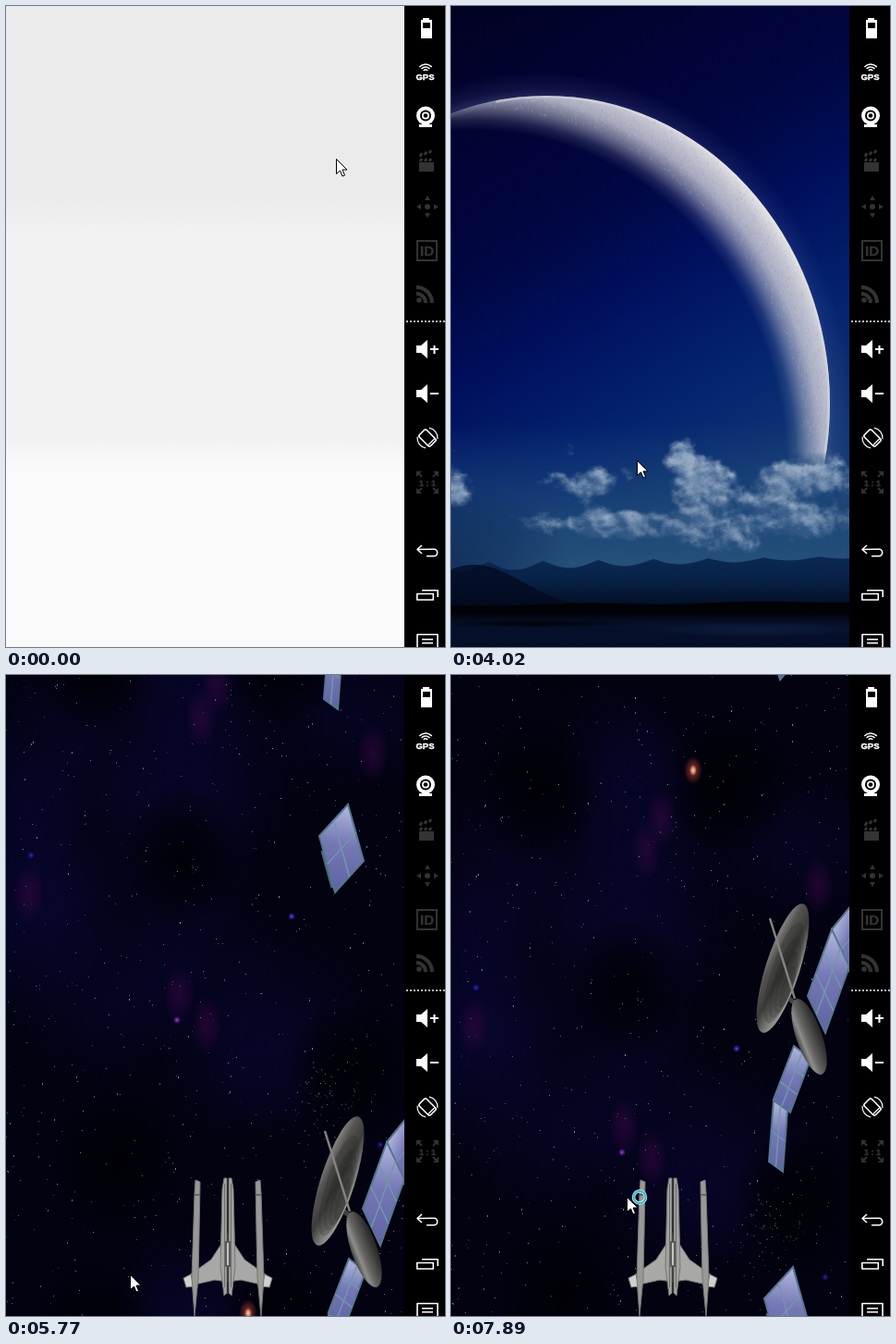
An HTML page with a canvas that plays this animation: 475 px wide and 693 px high, repeating every 8000 ms.

```html
<!DOCTYPE html>
<html>
<head>
<meta charset="utf-8">
<style>
html, body { margin: 0; width: 100%; height: 100%; overflow: hidden; background: #000; }
canvas { display: block; width: 475px; height: 693px; }
</style>
</head>
<body>
<canvas id="stage" width="475" height="693"></canvas>
<script>
const W = 431, H = 693, LOOP = 8000, TILE = 730;
const MENU = 4020, PRESS = 5220, FADE = 5490, GAME = 5610, BUSY = 7890;

// Pointer key points: time, x, y
const POINTER = [[0, 357, 165], [450, 357, 162], [1100, 358, 162], [1110, 194, 435], [1380, 201, 491],
  [4440, 201, 491], [4800, 182, 630], [5060, 134, 648], [7500, 134, 648], [BUSY, 190, 564]];

const clamp = (v, a = 0, b = 1) => Math.min(b, Math.max(a, v));
const mix = (a, b, k) => a + (b - a) * k;
const smooth = (a, b, v) => { const k = clamp((v - a) / (b - a)); return k * k * (3 - 2 * k); };

function layer(w, h, draw) {
  const c = document.createElement('canvas');
  c.width = w; c.height = h;
  draw(c.getContext('2d'));
  return c;
}

function random(seed) {
  return () => {
    seed = (seed + 0x6D2B79F5) | 0;
    let x = Math.imul(seed ^ (seed >>> 15), 1 | seed);
    x = (x + Math.imul(x ^ (x >>> 7), 61 | x)) ^ x;
    return ((x ^ (x >>> 14)) >>> 0) / 4294967296;
  };
}

function noise(x, y) {
  const i = Math.floor(x), j = Math.floor(y);
  const hash = (a, b) => { const s = Math.sin(a * 127.1 + b * 311.7) * 43758.5; return s - Math.floor(s); };
  const u = smooth(0, 1, x - i), v = smooth(0, 1, y - j);
  return mix(mix(hash(i, j), hash(i + 1, j), u), mix(hash(i, j + 1), hash(i + 1, j + 1), u), v);
}

function fractal(x, y) {
  let sum = 0;
  for (let o = 0, a = .5, f = 1 / 32; o < 5; o++, a *= .55, f *= 2) sum += a * noise(x * f, y * f);
  return sum / 1.055;
}

function path(c, pts) {
  c.beginPath();
  for (let i = 0; i < pts.length; i += 2) c.lineTo(pts[i], pts[i + 1]);
}

function line(c, pts, color, width) {
  path(c, pts);
  c.strokeStyle = color; c.lineWidth = width; c.stroke();
}

function poly(c, pts, fill, stroke, width = 1) {
  path(c, pts);
  c.closePath();
  c.fillStyle = fill; c.fill();
  if (stroke) { c.strokeStyle = stroke; c.lineWidth = width; c.stroke(); }
}

function disc(c, x, y, r, fill) {
  c.beginPath(); c.arc(x, y, r, 0, 7);
  c.fillStyle = fill; c.fill();
}

function arc(c, x, y, r, a, b, color, width) {
  c.beginPath(); c.arc(x, y, r, a, b);
  c.strokeStyle = color; c.lineWidth = width; c.stroke();
}

function shade(gradient, stops) {
  for (const [at, color] of stops) gradient.addColorStop(at, color);
  return gradient;
}

function glow(c, x, y, rx, ry, rgb, alpha) {
  c.save();
  c.translate(x, y); c.scale(rx, ry);
  disc(c, 0, 0, 1, shade(c.createRadialGradient(0, 0, 0, 0, 0, 1),
    [[0, `rgba(${rgb},${alpha})`], [.5, `rgba(${rgb},${alpha * .6})`], [1, `rgba(${rgb},0)`]]));
  c.restore();
}

const blank = layer(W, H, c => {
  c.fillStyle = shade(c.createLinearGradient(0, 0, 0, H), [[.3, '#ebebeb'],
    [.355, '#f2f2f2'], [.675, '#f2f2f2'], [.72, '#fafafa']]);
  c.fillRect(0, 0, W, H);
});

const moon = layer(W, H, c => {
  const rnd = random(5), r = 307, lean = -.7, shift = 102;
  const sx = -Math.cos(lean) * shift, sy = -Math.sin(lean) * shift;
  c.save();
  c.translate(103, 430); c.scale(1, 1.085);
  const halo = a => `rgba(120,135,205,${a})`;
  c.fillStyle = shade(c.createRadialGradient(sx * .1, sy * .1, r - 2, sx * .1, sy * .1, r + 32),
    [[0, halo(0)], [.2, halo(.3)], [.45, halo(.13)], [1, halo(0)]]);
  c.fillRect(-W, -H, 2 * W, 2 * H);
  c.beginPath(); c.arc(0, 0, r, 0, 7); c.clip();
  const body = a => `rgba(218,219,234,${a})`;
  c.fillStyle = shade(c.createRadialGradient(sx, sy, 338, sx, sy, r + shift),
    [[0, body(0)], [.15, body(.15)], [.33, body(.5)], [.55, body(.85)], [.8, body(1)], [1, '#fff']]);
  c.fillRect(-W, -H, 2 * W, 2 * H);
  for (let i = 0; i < 2500; i++) {
    const a = -1.9 + rnd() * 2.2, d = r - rnd() * 50, x = Math.cos(a) * d, y = Math.sin(a) * d;
    if (Math.hypot(x - sx, y - sy) < 362) continue;
    c.fillStyle = rnd() < .5 ? 'rgba(255,255,255,.16)' : 'rgba(120,120,155,.12)';
    c.fillRect(x, y, 1, 1 + rnd() * 2);
  }
  arc(c, 0, 0, r - 1, -1.75, .4, 'rgba(255,255,255,.45)', 3);
  c.restore();
  c.globalCompositeOperation = 'destination-out';
  c.fillStyle = shade(c.createLinearGradient(0, 482, 0, 502), [[0, 'rgba(0,0,0,0)'], [1, '#000']]);
  c.fillRect(0, 482, W, H);
});

const clouds = layer(W, H, c => {
  const puffs = [[6, 520, 24, 22], [140, 518, 40, 25], [247, 485, 24, 28], [287, 515, 36, 26],
    [382, 511, 54, 37], [170, 560, 85, 17], [335, 560, 95, 24]];
  const image = c.createImageData(W, H);
  for (let y = 440; y < 600; y++) for (let x = 0; x < W; x++) {
    let density = 0;
    for (const [px, py, rx, ry] of puffs) density += Math.exp(-(((x - px) / rx) ** 2) - ((y - py) / ry) ** 2);
    const n = fractal(x, y * 1.2);
    const slope = n - fractal(x + 4, y * 1.2 - 6);
    const lit = clamp(.5 + slope * 2.6 + (520 - y) / 150);
    const alpha = smooth(.42, .95, Math.min(density, 1) + (n - .5) * 1.5);
    image.data.set([mix(58, 186, lit), mix(100, 205, lit), mix(150, 228, lit), 225 * alpha], (y * W + x) * 4);
  }
  c.putImageData(image, 0, 0);
});

const night = layer(W, H, c => {
  c.fillStyle = shade(c.createLinearGradient(0, 0, 300, 520), [[0, '#020225'], [.2, '#020336'], [.45, '#01084c'],
    [.61, '#001268'], [.82, '#04287c'], [1, '#103a80']]);
  c.fillRect(0, 0, W, H);
  c.fillStyle = shade(c.createLinearGradient(0, 450, 0, 600), [[0, 'rgba(44,94,136,0)'], [1, 'rgba(44,94,136,.85)']]);
  c.fillRect(0, 450, W, H);
  glow(c, 0, 600, 130, 90, '10,35,85', .6);
  c.drawImage(moon, 0, 0);
  c.drawImage(clouds, 0, 0);

  const ridge = (height, fill) => {
    const pts = [];
    for (let x = 0; x <= W + 3; x += 3) pts.push(x, height(x));
    poly(c, [...pts, W, 656, 0, 656], fill);
  };
  ridge(x => 601 - x / 70 + (11 - x / 50) * Math.abs(Math.sin((x - 40) / 19)),
    shade(c.createLinearGradient(0, 595, 0, 650), [[0, '#0b2e5c'], [.5, '#09244d'], [1, '#040f26']]));
  ridge(x => 652 - 48 * Math.exp(-(((x - 25) / 75) ** 2)), 'rgba(3,10,34,.75)');
  ridge(x => 648 - x / 100 + Math.sin(x / 30), '#010206');
  c.fillStyle = shade(c.createLinearGradient(0, 655, 0, H), [[0, '#010206'], [.35, '#071230'], [1, '#06102c']]);
  c.fillRect(0, 655, W, 38);
  glow(c, 330, 674, 120, 8, '24,52,100', .4);
  glow(c, 90, 668, 110, 4, '0,0,4', .9);
});

const space = layer(W, TILE, c => {
  const rnd = random(77);
  const patch = (x, y, rx, ry, rgb, alpha) => {
    for (const wrap of [-TILE, 0, TILE]) glow(c, x, y + wrap, rx, ry, rgb, alpha);
  };
  c.fillStyle = '#020210';
  c.fillRect(0, 0, W, TILE);
  for (let i = 0; i < 14; i++)
    patch(rnd() * W, 120 + i * 34, 70 + rnd() * 60, 80 + rnd() * 60, '9,6,50', .5);
  for (const [x, y] of [[95, 130], [300, 120], [190, 340], [370, 570], [120, 670]]) patch(x, y, 68, 80, '0,0,5', .95);
  for (const [x, y] of [[211, 190], [228, 155], [397, 228], [187, 488], [217, 522], [25, 380]])
    patch(x, y, 17, 32, '50,7,64', .6);
  const star = hue => `hsla(${hue},45%,60%,${.25 + rnd() * .65})`;
  for (let i = 0; i < 620; i++) {
    c.fillStyle = star(180 + rnd() * 60);
    c.fillRect(Math.floor(rnd() * W), Math.floor(rnd() * TILE), 1, rnd() < .2 ? 2 : 1);
  }
  for (let i = 0; i < 70; i++) {
    c.fillStyle = star(185);
    c.fillRect(345 + (rnd() + rnd() - 1) * 45, 600 + (rnd() + rnd() - 1) * 55, 1, 1);
  }
  for (const [x, y, rgb] of [[27, 338, '40,40,200'], [309, 404, '70,70,255'], [405, 651, '50,30,170'], [185, 516, '160,50,230']]) {
    glow(c, x, y, 4, 4, rgb, .8);
    disc(c, x, y, 1, `rgb(${rgb})`);
  }
  glow(c, 262, 103, 10, 15, '150,50,40', .9);
  glow(c, 262, 103, 4, 6, '255,200,170', 1);
});

// A solar panel spanned from one corner by a width and a length vector.
function panel(c, x, y, wx, wy, lx, ly, rows) {
  const fill = shade(c.createLinearGradient(x, y, x + wx + lx, y + wy + ly),
    [[0, '#b3b9df'], [.45, '#7478b4'], [1, '#6063a2']]);
  poly(c, [x, y, x + wx, y + wy, x + wx + lx, y + wy + ly, x + lx, y + ly], fill, '#55778f', 2);
  line(c, [x + wx / 2, y + wy / 2, x + wx / 2 + lx, y + wy / 2 + ly], '#7296ae', 1.5);
  for (let k = 1 / rows; k < .99; k += 1 / rows)
    line(c, [x + lx * k, y + ly * k, x + wx + lx * k, y + wy + ly * k], '#7296ae', 1.5);
}

function tilted(c, x, y, rx, ry, angle, fill) {
  c.beginPath(); c.ellipse(x, y, rx, ry, angle, 0, 7);
  c.fillStyle = fill; c.fill();
}

function drawSatellites(c) {
  panel(c, 412, 275, 19, 45, 22, -27, 1);
  panel(c, 412, 275, 19, 40, -26, 72, 3);
  panel(c, 371, 401, 18, 14, -22, 58, 3);
  panel(c, 349, 460, 15, 11, -5, 66, 2);
  const metal = shade(c.createLinearGradient(335, 300, 383, 325),
    [[0, '#a9a9a5'], [.3, '#555452'], [.55, '#3c3c3a'], [.8, '#7f7f7c'], [1, '#a6a6a2']]);
  tilted(c, 359, 317, 18.5, 73, .31, metal);
  for (let i = 1; i < 5; i++)
    tilted(c, 359 + i * 1.2, 317 + i * 5, 17 - i * 3, 68 - i * 11, .31, 'rgba(28,28,27,.22)');
  line(c, [372, 350, 345, 263], '#83837f', 2.5);
  line(c, [366, 350, 384, 365], '#444', 5);
  tilted(c, 387.5, 391, 14, 43, -.33, shade(c.createLinearGradient(372, 396, 402, 384),
    [[0, '#282827'], [.25, '#8d8d89'], [.45, '#626260'], [.8, '#343433'], [1, '#1f1f1f']]));
  line(c, [342, 690, 353, 730], '#496879', 3);
  panel(c, 370, 640, 17, 61, -31, 34, 2);
}

const ship = layer(W, H, c => {
  const half = () => {
    poly(c, [240, 603, 235, 612, 222, 632, 194, 652, 195, 661, 226, 654, 240, 656], '#a8a8a6', '#777');
    poly(c, [192, 652, 200, 648, 203, 661, 195, 662], '#d0d0ce', '#777');
    poly(c, [205, 546, 210, 548, 209, 605, 208, 652, 204, 693, 201, 652, 204, 560], '#989896', '#777');
    poly(c, [234, 556, 236, 544, 239, 544, 239, 668, 236, 671, 232, 640], '#a2a2a0', '#777');
    line(c, [236.5, 550, 236.5, 662], '#6c6c6a', 1);
    line(c, [204, 562, 210, 562], '#666', 2);
  };
  half();
  c.save(); c.translate(480, 0); c.scale(-1, 1); half(); c.restore();
  line(c, [240, 545, 240, 668], '#30302f', 1.5);
  line(c, [240, 612, 240, 640], '#5b5b59', 6);
  line(c, [240, 614, 240, 638], '#c3c3c1', 2);
});

const sidebar = layer(44, H, c => {
  const on = '#fff', off = '#333';
  const box = (x, y, w, h, color) => { c.fillStyle = color; c.fillRect(x, y, w, h); };
  const text = (s, x, y, size, color) => {
    c.font = `bold ${size}px "Liberation Sans", sans-serif`;
    c.textAlign = 'center';
    c.fillStyle = c.strokeStyle = color;
    c.lineWidth = .4;
    c.fillText(s, x, y); c.strokeText(s, x, y);
  };
  box(0, 0, 44, H, '#000');
  c.translate(-W, 0);

  box(451, 13, 7, 3, on); box(449, 15, 12, 20, on); box(451, 18, 8, 6, '#000');

  for (const r of [3, 6, 9]) arc(c, 454, 72, r, -2.4, -.74, on, 1.5);
  text('GPS', 453.5, 80, 9.5, on);

  [10, 6, 4, 2.3].forEach((r, i) => disc(c, 454, 118.5, r, i % 2 ? '#000' : on));
  box(452, 127, 4, 3, on); box(447, 128, 14, 3, on);

  box(447, 169, 16, 10, off);
  for (let x = 448; x < 463; x += 5) {
    line(c, [x, 168, x + 2, 165], off, 3);
    line(c, [x, 163 - (x - 448) * .4, x + 2, 159 - (x - 448) * .3], off, 3);
  }

  disc(c, 456, 217, 3, off);
  for (let i = 0; i < 4; i++) {
    c.save(); c.translate(456, 217); c.rotate(i * Math.PI / 2);
    poly(c, [12, 0, 7, -3, 7, 3], off); c.restore();
  }

  text('ID', 455.5, 270, 15, off);
  c.lineWidth = 2; c.strokeRect(445, 254, 21, 21);

  disc(c, 447, 318, 2.8, off);
  for (const r of [10, 17]) arc(c, 444, 321, r, -Math.PI / 2, 0, off, 4);

  for (let x = 433; x < 475; x += 4) box(x, 340, 2, 2, '#bbb');

  for (const y of [371, 419]) {
    poly(c, [444, y - 4, 449, y - 4, 456, y - 10, 456, y + 10, 449, y + 4, 444, y + 4], on);
    box(459, y - 1, 9, 2, on);
  }
  box(462.5, 367, 2, 9, on);

  c.save(); c.translate(456, 467); c.rotate(-Math.PI / 4);
  c.strokeStyle = on; c.lineWidth = 1.6;
  c.beginPath(); c.roundRect(-5.5, -8.5, 11, 17, 2); c.stroke();
  line(c, [-5, 6, 5, 6], on, 1.2);
  c.restore();
  for (const a of [-1.4, 1.75]) arc(c, 456, 467, 11, a, a + 1.5, on, 1.2);

  text('1 : 1', 456, 519, 9, off);
  for (const sx of [-1, 1]) for (const sy of [-1, 1]) {
    c.save(); c.translate(456, 515); c.scale(sx, sy);
    poly(c, [12, 12, 6, 12, 12, 6], off);
    line(c, [6, 6, 11, 11], off, 2); c.restore();
  }

  c.lineJoin = 'round';
  line(c, [450, 583, 445, 587.5, 450, 592], on, 1.6);
  c.beginPath(); c.moveTo(445, 587.5);
  c.arc(463, 591, 3.7, -Math.PI / 2, Math.PI / 2); c.lineTo(455, 594.7);
  c.stroke();

  c.strokeRect(444.8, 635.5, 17.5, 6.5);
  line(c, [450, 631.8, 467.2, 631.8, 467.2, 639], on, 1.6);

  c.strokeRect(445, 679.5, 22, 20);
  for (const y of [684, 688]) box(450, y, 12, 1.5, on);
});

const ctx = document.getElementById('stage').getContext('2d');

function drawButton(label, x, y, fill) {
  ctx.beginPath(); ctx.roundRect(x, y, 164, 68, 9);
  ctx.fillStyle = fill; ctx.fill();
  ctx.font = 'bold 29px Roboto, sans-serif';
  ctx.textAlign = 'center';
  ctx.fillStyle = '#080808';
  ctx.fillText(label, x + 82, y + 46);
}

function drawNight(t) {
  ctx.drawImage(night, 0, 0);
  if (t < MENU) return;
  const k = (t - MENU) / 780;
  ctx.fillStyle = `rgba(0,0,0,${Math.min(.23, .1 + .09 * k)})`;
  ctx.fillRect(0, 0, W, H);
  const y = 626 + 70 * (1 - clamp(k)) ** 1.5;
  drawButton('Go', 7, y, t >= PRESS ? '#7d7873' : '#9b9590');
  drawButton('Exit', 253, y, '#9b9590');
}

function drawTiled(offset, draw) {
  const y = Math.round((offset % TILE + TILE) % TILE);
  for (const top of [y, y - TILE]) {
    ctx.save(); ctx.translate(0, top); draw(ctx); ctx.restore();
  }
}

function drawGame(t) {
  drawTiled((t - BUSY) * .0674, c => c.drawImage(space, 0, 0));
  drawTiled((t - BUSY) * .236, drawSatellites);
  ctx.drawImage(ship, 0, 0);
}

function drawPointer(t) {
  const next = POINTER.findIndex(p => p[0] > t);
  const b = POINTER.at(next), a = next > 0 ? POINTER[next - 1] : b;
  const k = a === b ? 0 : (t - a[0]) / (b[0] - a[0]);
  ctx.save();
  ctx.translate(Math.round(mix(a[1], b[1], k)) + .5, Math.round(mix(a[2], b[2], k)) + .5);
  poly(ctx, [0, 0, 0, 16, 4, 12.5, 6.5, 18.5, 9, 17.5, 6.5, 11.5, 11.5, 11.5], '#fff', '#000');
  if (t >= BUSY) {
    arc(ctx, 13.5, 0, 6.5, 0, 7, '#d5f4f4', 3.5);
    arc(ctx, 13.5, 0, 6.5, 0, 7, '#35b5c0', 2);
  }
  ctx.restore();
}

function hold(t) {
  const grid = (origin, step) => origin + Math.floor((t - origin) / step) * step;
  if (t < MENU) return grid(0, 139);
  if (t < 5770) return grid(MENU, 130);
  const beat = grid(6330, 390);
  return Math.max(5770, beat + 120 * Math.min(2, Math.floor((t - beat) / 120)));
}

function render(now) {
  const t = hold(now);
  ctx.save();
  ctx.beginPath(); ctx.rect(0, 0, W, H); ctx.clip();
  if (now < 300) {
    ctx.drawImage(blank, 0, 0);
    ctx.globalAlpha = .6;
    if (now >= 150) drawNight(t);
  } else if (now < GAME) {
    drawNight(t);
    ctx.globalAlpha = .5;
    if (now >= FADE) drawGame(t);
  } else drawGame(t);
  ctx.globalAlpha = 1;
  drawPointer(t);
  ctx.restore();
  ctx.drawImage(sidebar, W, 0);
}

const start = performance.now();
function tick() {
  render((performance.now() - start) % LOOP);
  requestAnimationFrame(tick);
}
tick();
</script>
</body>
</html>
```
